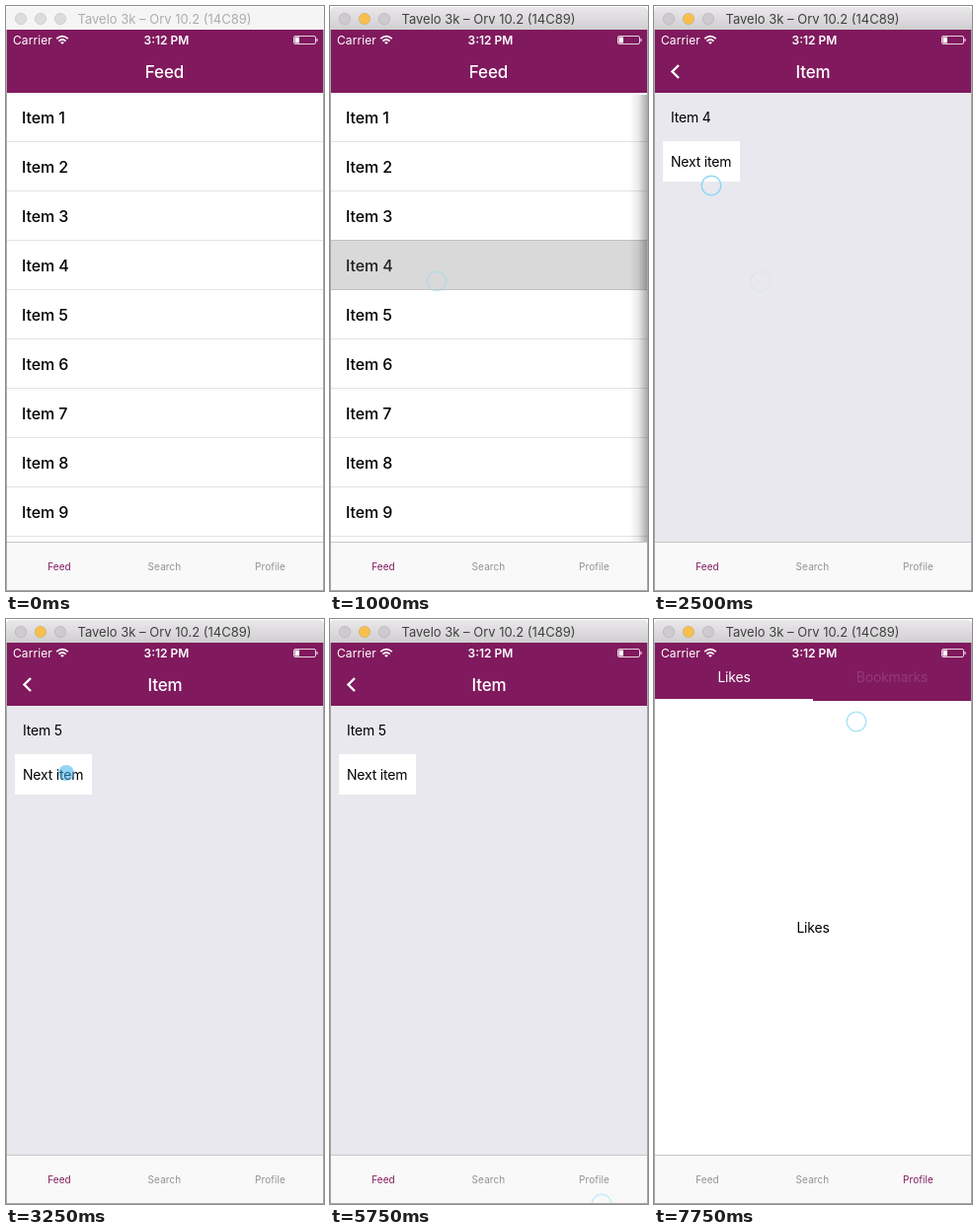
Write an HTML page that moves like this. It is 322 by 593 pixels and loops after 8000 ms.

```html
<!DOCTYPE html>
<html lang="en">
<head>
<meta charset="utf-8">
<title>Tab and stack navigation</title>
<style>
  html, body { margin: 0; width: 100%; height: 100%; overflow: hidden; background: #fff; }
  svg { display: block; width: 322px; height: 593px; font-family: Inter, Roboto, sans-serif; }
  .mid { text-anchor: middle; }
  .body { font-size: 14px; letter-spacing: -.2px; }
  .row { font-size: 16px; font-weight: 500; letter-spacing: -.1px; }
  .heading { font-size: 17px; font-weight: 500; letter-spacing: -.1px; fill: #fff; }
  .status { font-size: 12px; fill: #fff; }
  .tab { font-size: 10px; letter-spacing: .1px; }
</style>
</head>
<body>
<svg viewBox="0 0 322 593">
  <defs>
    <linearGradient id="chrome" x2="0" y2="1">
      <stop stop-color="#ebe9eb"/><stop offset="1" stop-color="#d0ced0"/>
    </linearGradient>
    <linearGradient id="shade">
      <stop stop-opacity="0"/><stop offset=".5" stop-opacity=".08"/><stop offset="1" stop-opacity=".32"/>
    </linearGradient>
    <clipPath id="window"><path d="M0 593V6Q0 1 5 1H317Q322 1 322 6V593Z"/></clipPath>
    <clipPath id="content"><rect x="1" y="88" width="320" height="455"/></clipPath>
    <clipPath id="screen"><rect x="1" y="24" width="320" height="569"/></clipPath>
  </defs>

  <g clip-path="url(#window)">
    <rect id="titleBar" width="322" height="24"/>
    <g id="lights"></g>
    <text id="windowTitle" class="mid" x="160.5" y="18" font-size="13">Tavelo 3k – Orv 10.2 (14C89)</text>

    <g clip-path="url(#screen)">
      <rect y="24" width="322" height="569" fill="#fff"/>
      <rect id="header" y="24" width="322" fill="#80195d"/>

      <g clip-path="url(#content)">
        <g id="feed"></g>
        <g id="item4"></g>
        <g id="item5"></g>
      </g>

      <g id="feedTitle"><text class="heading mid" x="160.5" y="73">Feed</text></g>
      <g id="itemTitle4"><text class="heading mid" x="161" y="73">Item</text></g>
      <g id="itemTitle5"><text class="heading mid" x="161" y="73">Item</text></g>
      <path id="back" d="M25 60L18.5 66.5L25 73" fill="none" stroke="#fff" stroke-width="2.4"/>

      <g id="profile">
        <text class="body mid" x="81" y="64" fill="#fff">Likes</text>
        <text id="bookmarks" class="body mid" x="241" y="64" fill="#fff">Bookmarks</text>
        <rect x="1" y="81" width="160" height="2" fill="#fff"/>
        <text class="body mid" x="161" y="318">Likes</text>
      </g>

      <text class="status" x="7" y="38.5" letter-spacing=".1">Carrier</text>
      <g fill="none" stroke="#fff" stroke-width="1.7">
        <path d="M51.2 33.2Q57 28 62.8 33.2M53.4 35.6Q57 32.4 60.6 35.6"/>
        <path d="M57 38.8L55 36.9Q57 35.5 59 36.9Z" fill="#fff" stroke="none"/>
      </g>
      <text class="status mid" x="162.5" y="38.5" font-weight="600">3:12 PM</text>
      <rect x="291.5" y="30.5" width="22" height="8" rx="1.5" fill="none" stroke="#fff" stroke-opacity=".8"/>
      <path d="M292.5 31.5h4.5v6h-4.5zM314.5 33h1v3h-1z" fill="#fff"/>

      <rect y="543" width="322" height="50" fill="#f9f9f9"/>
      <rect y="543" width="322" height="1" fill="#c6c6c8"/>
      <g id="tabs"></g>

      <circle id="ghost" cx="108" cy="279" r="10" fill="none" stroke="#cfe3ee" stroke-width="1.2"/>
      <circle id="ring" r="9.8" fill="none" stroke="#8fd9f2" stroke-width="1.5"/>
      <circle id="dot" r="8" fill="#40b0eb" fill-opacity=".55"/>
    </g>
    <path d="M.5 593V24M321.5 593V24M0 592.5H322" stroke="#a8a8a8" fill="none"/>
  </g>
</svg>

<script>
const LOOP = 8000;
const PLUM = '#80195d';
const $ = id => document.getElementById(id);
const set = (id, attrs) => {
  for (const name in attrs) $(id).setAttribute(name, attrs[name]);
};

const rows = Array.from({ length: 9 }, (_, i) => i);
$('feed').innerHTML = `
  <rect y="88" width="322" height="455" fill="#fff"/>
  <rect id="pressedRow" y="237" width="322" height="51" fill="#d9d9d9"/>` +
  rows.map(i => `
  <text id="row${i + 1}" class="row" x="16" y="${119 + 50 * i}">Item ${i + 1}</text>
  <rect y="${137 + 50 * i}" width="322" height="1" fill="#000" fill-opacity=".11"/>`).join('');

for (const n of [4, 5]) {
  $('item' + n).innerHTML = `
    <rect x="-17" y="90" width="18" height="455" fill="url(#shade)"/>
    <rect x="1" y="88" width="321" height="455" fill="#e9e8ee"/>
    <text class="body" x="17" y="118">Item ${n}</text>
    <g id="next${n}">
      <rect x="9" y="137" width="78" height="41" fill="#fff"/>
      <text class="body" x="17" y="163">Next item</text>
    </g>`;
}

$('lights').innerHTML = [15, 35, 55].map((x, i) =>
  `<circle id="light${i}" cx="${x}" cy="13" r="5.7" stroke="#000" stroke-opacity=".1"/>`).join('');

const tabs = [['Feed', 54], ['Search', 160.5], ['Profile', 267.5]];
$('tabs').innerHTML = tabs.map(([name, x]) =>
  `<text id="tab${name}" class="tab mid" x="${x}" y="572">${name}</text>`).join('');

// Each layer is [x offset, opacity]; layers left out are hidden.
const LAYERS = ['feed', 'item4', 'item5', 'feedTitle', 'itemTitle4', 'itemTitle5', 'back', 'profile'];
const shown = [0, 1];
const feedView = { feed: shown, feedTitle: shown };
const item4View = { item4: shown, itemTitle4: shown, back: shown };
const item5View = { item5: shown, itemTitle5: shown, back: shown };
const profileView = { profile: shown };

const pushView = p => ({
  item4: [-10 * p, 1 - .7 * p],
  item5: [320 * (1 - p), 1],
  itemTitle4: [-200 * p, 1 - p],
  itemTitle5: [200 * (1 - p), p],
  back: shown
});

const dotAt = (x, y) => ({ dot: [x, y], ring: null });
const ringAt = (x, y, alpha) => ({ dot: null, ring: [x, y, alpha] });

// Every step changes only the values it names.
const steps = [
  [0, { view: feedView, active: false, tab: 'Feed', press: '', dot: null, ring: null, ghost: 0 }],
  [250, dotAt(120, 146)],
  [500, dotAt(111, 261)],
  [750, { active: true, ...ringAt(108, 279, 1) }],
  [1000, { view: { ...feedView, item4: [320, 1] }, press: 'row', ...ringAt(108, 279, .45) }],
  [1250, { view: item4View, press: '', ring: null, ghost: .6 }],
  [1500, dotAt(71, 187)],
  [1750, dotAt(61, 163)],
  [2500, ringAt(58, 182, 1)],
  [2750, { press: 'next', ...ringAt(58, 182, .4) }],
  [3000, { view: pushView(.46), press: '', ring: null, ghost: 0 }],
  [3250, { view: item5View, ...dotAt(61, 156) }],
  [4250, dotAt(243, 540)],
  [4500, dotAt(278, 575)],
  [5500, ringAt(275, 593, 1)],
  [5750, ringAt(275, 593, .45)],
  [6000, { view: profileView, tab: 'Profile', ring: null }],
  [6250, dotAt(278.5, 575)],
  [6500, dotAt(230, 306)],
  [6750, dotAt(209, 85)],
  [7500, ringAt(205, 104, 1)],
  [7750, { press: 'bookmarks', ...ringAt(205, 104, .7) }]
];

let state = {};
const timeline = steps.map(([at, change]) => ({ at, state: state = { ...state, ...change } }));

function draw({ view, active, tab, press, dot, ring, ghost }) {
  for (const id of LAYERS) {
    const [x, opacity] = view[id] || [0, 0];
    set(id, { transform: `translate(${x} 0)`, opacity });
  }
  set('header', { height: view.profile ? 59 : 64 });
  set('titleBar', { fill: active ? 'url(#chrome)' : '#f5f5f5' });
  set('windowTitle', { fill: active ? '#404040' : '#acacac' });
  for (const i of [0, 1, 2]) {
    set('light' + i, { fill: !active ? '#dcdcdc' : i === 1 ? '#f8bf4c' : '#cdcbcd' });
  }
  for (const [name] of tabs) set('tab' + name, { fill: name === tab ? PLUM : '#929292' });

  set('pressedRow', { opacity: press === 'row' ? 1 : 0 });
  set('row4', { opacity: press === 'row' ? .85 : 1 });
  set('next4', { opacity: press === 'next' ? .4 : 1 });
  set('bookmarks', { opacity: press === 'bookmarks' ? .14 : .6 });

  const [dx, dy] = dot || [0, 0];
  const [rx, ry, alpha] = ring || [0, 0, 0];
  set('dot', { cx: dx, cy: dy, opacity: dot ? 1 : 0 });
  set('ring', { cx: rx, cy: ry, opacity: alpha });
  set('ghost', { opacity: ghost });
}

const start = performance.now();
let current;
function tick() {
  const time = (performance.now() - start) % LOOP;
  const step = timeline.filter(s => s.at <= time).pop();
  if (step !== current) draw((current = step).state);
  requestAnimationFrame(tick);
}
tick();
</script>
</body>
</html>
```
